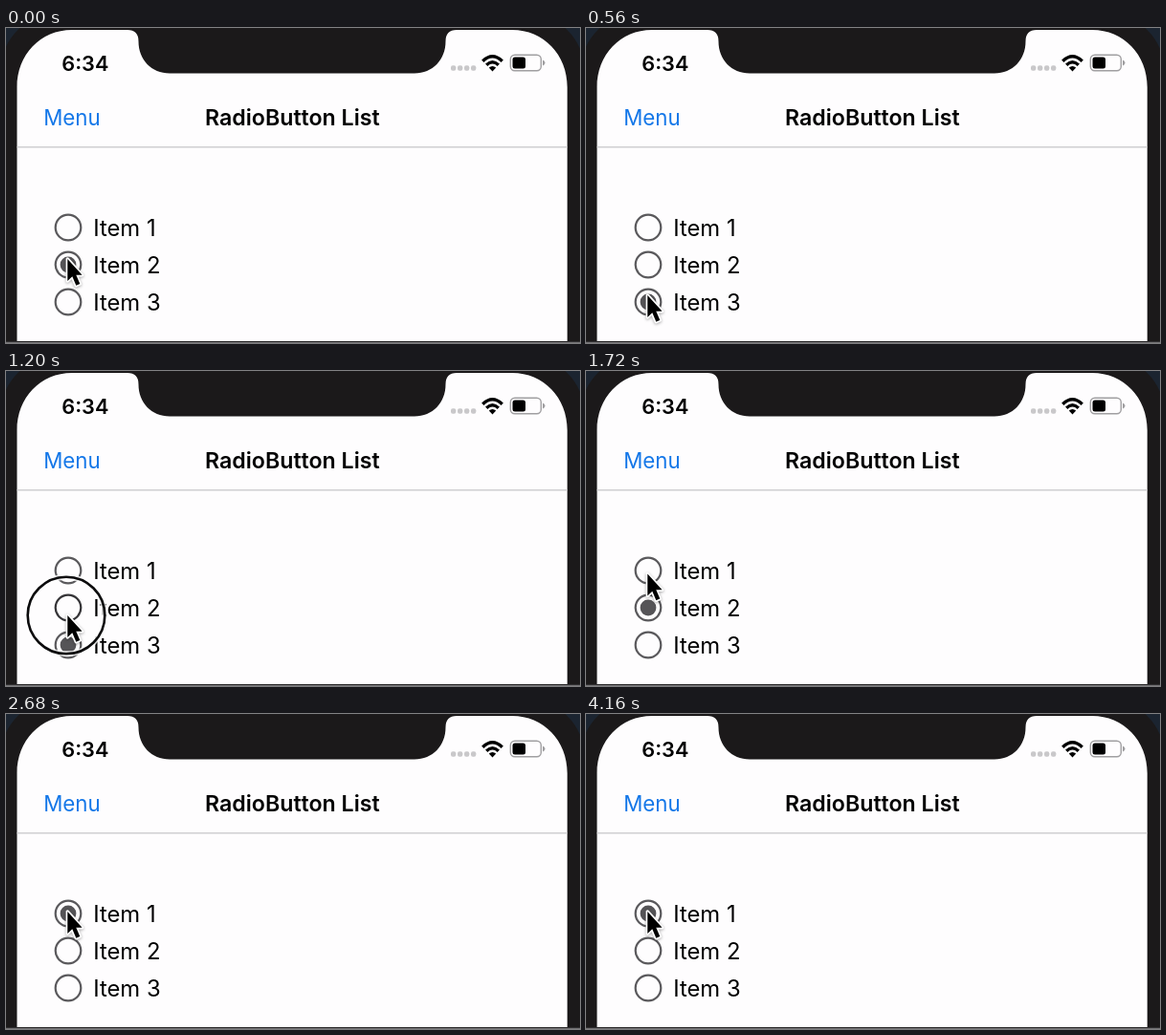
These frames come from a looping animation (600x330 px, 4.2 s). An HTML page:

```html
<!DOCTYPE html>
<html lang="en">
<head>
<meta charset="utf-8">
<title>RadioButton List</title>
<style>
  html, body { margin: 0; width: 600px; height: 330px; overflow: hidden; background: #1b191a; }
  svg { display: block; font-family: Inter, Roboto, sans-serif; }
  .bold { font-weight: 600; font-size: 23.2px; }
  .item { font-size: 23.8px; }
  .radio { fill: none; stroke: #5a595c; stroke-width: 2.2; }
  .dot { fill: #555457; }
  .arrow { filter: drop-shadow(0 1px 1.5px #0005); }
</style>
</head>
<body>
<svg width="600" height="330" viewBox="0 0 600 330">
  <rect width="600" height="330" fill="#1b2430"/>
  <rect x="-6" y="-16" width="611" height="420" rx="62" fill="#1b191a"/>
  <!-- screen with notch -->
  <path fill="#fefdfe" d="M11.500 330V62C11.500 28 36 2 69 2H127Q138.500 2 138.500 14C138.500 33 152 47.500 171 47.500H427C446 47.500 459.500 33 459.500 14Q459.500 2 471 2H529C562 2 586.700 28 586.700 62V330Z"/>
  <rect x="11.500" y="124" width="575.200" height="1.500" fill="#d0cfd2"/>
  <rect y="328" width="600" height="1" fill="#2b2a2c"/>
  <rect y="329" width="600" height="1" fill="#6f6e70"/>

  <text class="bold" x="58.300" y="44.600" style="font-size:21.700px">6:34</text>
  <g fill="#c9c8ca">
    <rect x="465" y="39.300" width="5.300" height="5.500" rx="2"/>
    <rect x="472" y="39.300" width="5.300" height="5.500" rx="2"/>
    <rect x="479" y="39.300" width="5.300" height="5.500" rx="2"/>
    <rect x="486" y="39.300" width="5.300" height="5.500" rx="2"/>
  </g>
  <g fill="none" stroke="#000" stroke-width="3.300">
    <path d="M498.300 34.700Q508.500 24.800 518.700 34.700"/>
    <path d="M502.200 38.800Q508.500 32.800 514.800 38.800"/>
  </g>
  <path d="M504.800 41.600Q508.500 38.600 512.200 41.600L508.500 45.500Z"/>
  <rect x="527.300" y="28.300" width="32" height="16.400" rx="4.500" fill="none" stroke="#a09fa1" stroke-width="1.400"/>
  <rect x="529.500" y="30.500" width="13.500" height="12" rx="2.500"/>
  <path d="M561 33.500Q563.500 34.500 563.500 36.500T561 39.500Z" fill="#a09fa1"/>

  <text x="39.200" y="102.200" font-size="22.300" fill="#1477e8">Menu</text>
  <text class="bold" x="299.300" y="102.400" text-anchor="middle">RadioButton List</text>

  <g id="list"></g>

  <g id="pointer">
    <g id="ring" fill="none">
      <circle cx="-1.300" r="40.300" stroke="#fff" stroke-width="6" stroke-opacity=".8"/>
      <circle cx="-1.300" r="40.300" stroke="#0c0c0d" stroke-width="2.600"/>
    </g>
    <path class="arrow" d="M0 0V23L5 18.300L9 27.800L13 26L9 16.800H15.300Z"
          stroke="#fff" stroke-width="3.400" paint-order="stroke" stroke-linejoin="round"/>
  </g>
</svg>
<script>
const LOOP = 4200, STEP = 40, DELAY = 40, FADE = 80;
const START = { y: 242, item: 1 };
const clicks = [
  { from: 120, to: 280, press: 280, release: 400, y: 280, item: 2 },
  { from: 840, to: 1120, press: 1120, release: 1280, y: 256, item: 1 },
  { from: 1400, to: 1820, press: 1840, release: 2000, y: 207, item: 0 },
];
const $ = id => document.getElementById(id);
const progress = (t, a, b) => Math.min(1, Math.max(0, (t - a) / (b - a)));
const ease = p => p < .5 ? 2 * p * p : 1 - 2 * (1 - p) ** 2;

$('list').innerHTML = [0, 1, 2].map(i => {
  const y = 209 + 39 * i;
  return `<circle class="radio" cx="65" cy="${y}" r="13.300"/>
    <circle class="dot" cx="65" cy="${y}" r="8.400"/>
    <text class="item" x="91.200" y="${y + 8.5}">Item ${i + 1}</text>`;
}).join('');
const radios = document.querySelectorAll('.radio');
const dots = document.querySelectorAll('.dot');

function draw(t) {
  let { y, item } = START, pressed = false;
  const fill = [0, 0, 0], dark = [0, 0, 0];
  fill[item] = 1;
  for (const c of clicks) {
    const change = c.release + DELAY;
    y += (c.y - y) * ease(progress(t, c.from, c.to));
    pressed ||= t >= c.press && t < c.release;
    if (t >= c.press && t < change + FADE) dark[c.item] = 1;
    const k = progress(t, change, change + FADE);
    fill[item] *= 1 - k;
    fill[c.item] = Math.max(fill[c.item], k);
    item = c.item;
  }
  $('pointer').setAttribute('transform', `translate(64.300 ${y})`);
  $('ring').style.display = pressed ? '' : 'none';
  dots.forEach((dot, i) => dot.style.opacity = fill[i]);
  radios.forEach((radio, i) => radio.style.stroke = dark[i] ? '#353437' : '');
}

function tick() {
  draw(Math.floor(performance.now() % LOOP / STEP) * STEP);
  requestAnimationFrame(tick);
}
tick();
</script>
</body>
</html>
```
